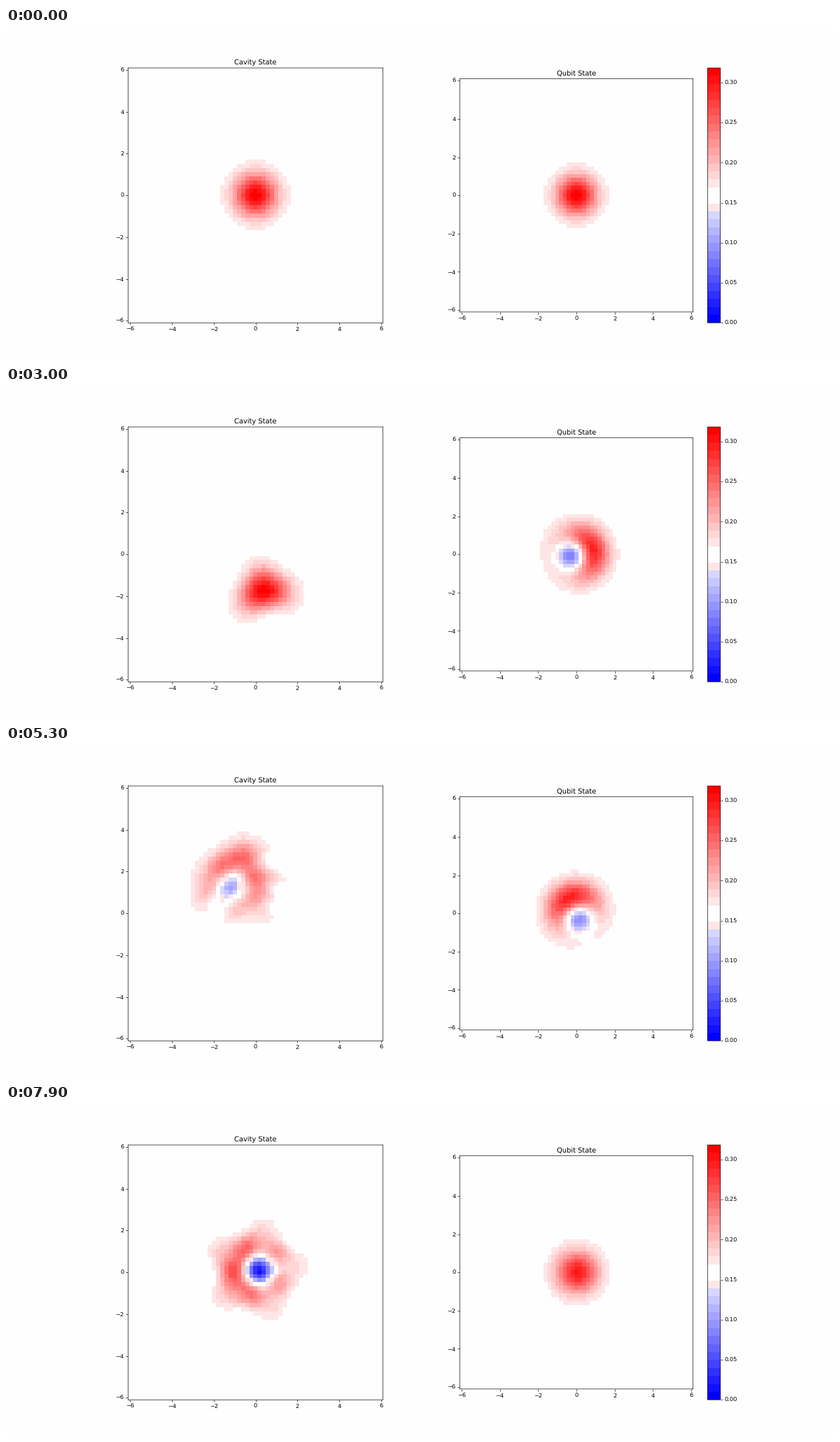
A matplotlib script that plays this animation: 1183x473 px, repeating every 8000 ms.

```python
import math

import numpy as np
import matplotlib.pyplot as plt
from matplotlib.animation import FuncAnimation
from matplotlib.colors import ListedColormap

W, H, DPI = 1183, 473, 64
FRAMES, STEP = 80, 100
K = 59.15 / DPI          # scale of text and strokes
NUDGE = 0.295            # half-pixel line offset at full render size
PAPER = "#fefefe"
TOP = 1 / math.pi

plt.rcParams.update({
    "font.family": "DejaVu Sans", "font.size": 10 * K, "text.hinting": "none",
    "axes.linewidth": 0.8 * K, "axes.titlepad": 6 * K,
    "figure.facecolor": PAPER, "axes.facecolor": PAPER,
})
for side in ("xtick", "ytick"):
    plt.rcParams.update({f"{side}.major.size": 3.5 * K,
                         f"{side}.major.width": 0.8 * K,
                         f"{side}.major.pad": 3.5 * K})

GRID = np.linspace(-6, 6, 61)
X, Y = np.meshgrid(GRID, GRID)
PLANE = X + 1j * Y

# time, cavity radius, cavity angle, qubit excitation, qubit direction
KEYS = np.array([
    (0, 0, 558, 0, -150),
    (18, .43, 54, .6, -90),
    (30, 1.8, -77, .65, 17),
    (37, 2.06, -174, .88, -20),
    (46, 2.85, -443, .75, 135),
    (60, .36, -750, .43, 92),
    (64, .15, -750, .08, 80),
    (79, .1, -660, .06, 0)])


def keyed(t, column):
    return np.interp(t, KEYS[:, 0], KEYS[:, column])


def ease(t, a, b):
    s = min(max((t - a) / (b - a), 0), 1)
    return s * s * (3 - 2 * s)


def polar(r, angle):
    return r * np.exp(1j * angle)


def laguerre(m, k, x):
    terms = [(-1) ** j * math.comb(m + k, m - j) / math.factorial(j)
             for j in range(m, -1, -1)]
    return np.polyval(terms, x)


def wigner(rho, center=0):
    """Wigner function times pi of a density matrix in the Fock basis."""
    z = math.sqrt(2) * (PLANE - center)
    q = np.abs(z) ** 2
    total = np.zeros_like(q)
    for m in range(len(rho)):
        for n in range(m, len(rho)):
            if abs(rho[m, n]) < 1e-7:
                continue
            scale = (-1) ** m * math.sqrt(math.factorial(m) / math.factorial(n))
            part = (rho[m, n] * z ** (n - m)).real * scale * laguerre(m, n - m, q)
            total += part if m == n else 2 * part
    return total * np.exp(-q / 2)


def pure(c):
    c = c / np.linalg.norm(c)
    return np.outer(c, c.conj())


def shape(t, r, angle):
    """Rippled vacuum that turns into a rippled one-photon ring."""
    c = np.zeros(7, complex)
    c[0] = 1
    c[2] = polar(.1 * (1 - r), 2 * angle)
    c[3] = polar(.08, 3 * (angle + math.pi))
    c[2:4] *= min(t / 18, 1)
    ring = np.zeros(7, complex)
    ring[0], ring[1] = -.25, 1
    ring[6] = polar(.11, math.pi + .19 * (t - 60))
    g = ease(t, 48, 58)
    return pure((1 - g) * c + g * ring)


def crescent(angle):
    n = np.arange(12)
    d = n - 3.9
    return pure(np.exp(-(d / 2.6) ** 2) * np.exp(1j * (n * angle - .045 * d ** 3)))


def cavity(t):
    r, angle = keyed(t, 1), math.radians(keyed(t, 2))
    r += 1.6 * math.sin(math.pi * min(t / 18, 1))
    mix = ease(t, 37, 45) * (1 - ease(t, 49, 57))
    out = np.zeros_like(X)
    if mix < 1:
        out += (1 - mix) * wigner(shape(t, r, angle), polar(r, angle))
    if mix > 0:
        out += mix * wigner(crescent(angle + .2))
    return out


def qubit(t):
    p, angle = keyed(t, 3), math.radians(keyed(t, 4))
    purity = .92 - .46 * math.exp(-((t - 37) / 3) ** 2)
    purity *= 1 - .9 * ease(t, 60, 66)
    c = polar(purity * math.sqrt(p * (1 - p)), angle)
    return wigner(np.array([[1 - p, np.conj(c)], [c, p]]))


def level(w):
    return (w + 1) / 2 * TOP


colors = plt.get_cmap("bwr")(np.linspace(0, 1, 32))
colors[14] = colors[17]
colors[15:17, :3] = 254 / 255
cmap = ListedColormap(colors)

fig, axes = plt.subplots(1, 2, figsize=(W / DPI, H / DPI), dpi=DPI)
fig.subplots_adjust(left=.125 + NUDGE / W, right=.9 + NUDGE / W,
                    bottom=.11 - NUDGE / H, top=.88 - NUDGE / H)
images = []
for ax, title in zip(axes, ("Cavity State", "Qubit State")):
    images.append(ax.imshow(np.full(X.shape, TOP / 2), cmap=cmap, vmin=0, vmax=TOP,
                            origin="lower", extent=(-6.1, 6.1, -6.1, 6.1),
                            interpolation="nearest"))
    ax.set_title(title)
    ax.set_xticks(range(-6, 7, 2))
    ax.set_yticks(range(-6, 7, 2))
    for spine in ax.spines.values():
        spine.set_snap(False)
bar = fig.colorbar(images[1], ax=axes[1], ticks=np.arange(7) * .05)
bar.ax.set_yticklabels([f"{v * .05:.2f}" for v in range(7)])
bar.outline.set_snap(False)


def draw(i):
    images[0].set_data(level(cavity(i)))
    images[1].set_data(level(qubit(i)))
    return images


anim = FuncAnimation(fig, draw, frames=FRAMES, interval=STEP, repeat=True,
                     repeat_delay=0, init_func=lambda: draw(0))
plt.show()
```
